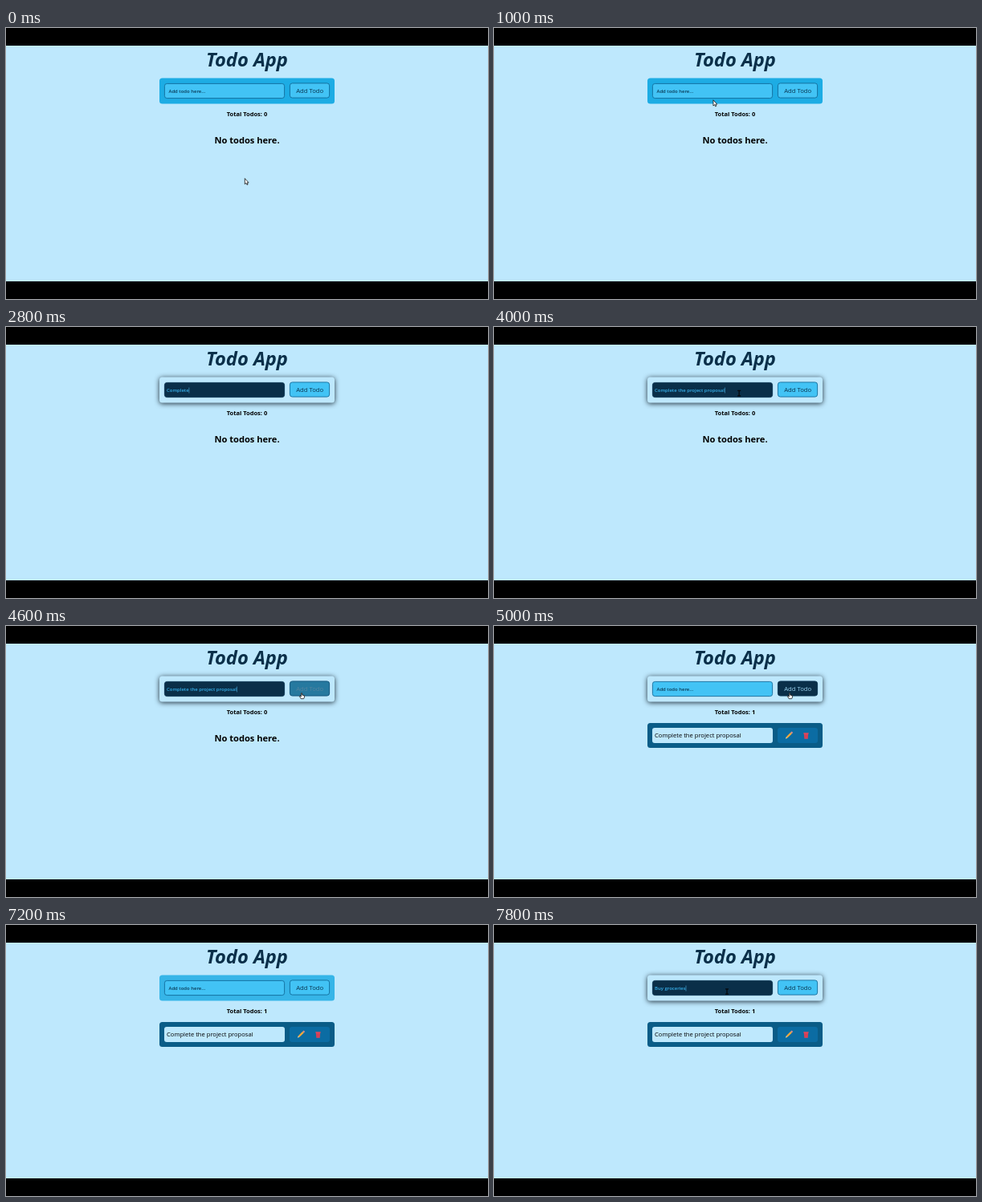
An HTML page for the animation above (8 s loop, 600 by 338 pixels).

```html
<!DOCTYPE html>
<html lang="en">
<head>
<meta charset="utf-8">
<title>Todo App</title>
<style>
  html, body { margin: 0; width: 100%; height: 100%; overflow: hidden; background: #000; }
  svg { display: block; width: 100%; height: 100%; font-family: "Open Sans", "Noto Sans", sans-serif; }
  .mid { text-anchor: middle; }
  .bold { font-weight: 700; }
  .small { font-size: 5.95px; font-weight: 600; }
</style>
</head>
<body>
<svg viewBox="0 0 600 338">
  <rect y="22" width="600" height="294" fill="#bee8fd"/>
  <text class="mid bold" x="300" y="48" font-size="23.7" font-style="italic" fill="#0a2f49">Todo App</text>

  <rect id="form" x="191" y="62.5" width="218" height="32" rx="3.5"/>
  <rect id="field" x="197.4" y="69.4" width="149.2" height="18.2" rx="3" stroke-width="0.9"/>
  <text id="hint" class="small" x="202.5" y="81.2" fill="#0b3d5a">Add todo here...</text>
  <text id="typed" class="small" x="200" y="81.2" fill="#36aee8"></text>
  <rect id="caret" y="75.5" width="0.6" height="7" fill="#4fb0de"/>
  <rect id="add" x="353.4" y="68.9" width="49.2" height="18.2" rx="3" stroke-width="0.9"/>
  <text id="addText" class="mid" x="378.2" y="81.2" font-size="7.7" font-weight="500">Add Todo</text>

  <text id="total" class="mid bold" x="300" y="110.3" font-size="7.5"></text>
  <text id="none" class="mid bold" x="300" y="143.5" font-size="11.1">No todos here.</text>

  <g id="card">
    <rect x="191" y="121" width="218" height="31" rx="3.5" fill="#0a5c87"/>
    <rect x="197" y="127" width="150" height="19" rx="3" fill="#bee8fd"/>
    <text x="200" y="138.9" font-size="7.6" font-weight="500">Complete the project proposal</text>
    <rect x="353" y="127" width="50" height="19" rx="3" fill="#0b6ca3"/>
    <path d="M364.6 139 L370 133.6" stroke="#f5a93a" stroke-width="2.2"/>
    <path d="M370 133.6 L371.4 132.2" stroke="#d98a8f" stroke-width="2.2"/>
    <path d="M362.8 140.8 L363.8 138.2 L365.4 139.8Z" fill="#e9d3a4"/>
    <path d="M385.3 133.2H391.7V134.5H391.2L390.7 140.8H386.3L385.8 134.5H385.3Z" fill="#e0465c"/>
    <path d="M387.3 135.5V139.8M389.7 135.5V139.8" stroke="#b3324b" stroke-width="0.6"/>
  </g>

  <g id="pointer">
    <path id="arrow" d="M0 0V7.2L1.6 5.8L2.7 8L3.8 7.5L2.8 5.3H4.8Z" fill="#fff" stroke="#111" stroke-width="0.8"/>
    <path id="beam" d="M-2 -3.2H2M0 -3.2V3.2M-2 3.2H2" fill="none" stroke="#05090d" stroke-width="1.3"/>
    <path id="hand" d="M-0.7 0.4Q0 -0.5 0.7 0.4V2.6L3.4 3.3V5.6L2.6 7.2H-0.8L-2.7 4.2L-2 3.6L-0.7 4.6Z" fill="#fff" stroke="#111" stroke-width="0.8"/>
  </g>
</svg>
<script>
const LOOP = 8000, STEP = 200;
const el = {};
document.querySelectorAll("[id]").forEach(n => el[n.id] = n);

// Pointer moves: start, end, target x and y
const moves = [
  [0, 1200, 271, 82],
  [3600, 4600, 368, 83.5],
  [6200, 6400, 487.2, 130.4],
  [6400, 7400, 290, 83]
];

// Eased rise from 0 to 1
function ramp(t, from, to) {
  const p = Math.min(1, Math.max(0, (t - from) / (to - from)));
  return p * p * (3 - 2 * p);
}

const within = (t, from, to) => t >= from && t < to;
const mix = (a, b, p) => `color-mix(in srgb, ${b} ${p * 100}%, ${a})`;
const show = (node, on) => node.style.display = on ? "" : "none";

function paint(node, fill, stroke) {
  node.style.fill = fill;
  if (stroke) node.style.stroke = stroke;
}

function pointerAt(t) {
  let x = 297.3, y = 187.6;
  for (const [from, to, tx, ty] of moves) {
    const p = ramp(t, from, to);
    x += (tx - x) * p;
    y += (ty - y) * p;
  }
  return [x, y];
}

function pointerKind(x, y) {
  if (y < 69 || y > 88) return "arrow";
  if (x > 197 && x < 347) return "beam";
  return x > 353 && x < 403 ? "hand" : "arrow";
}

// Text appears a word per step
function typedText(t) {
  if (t >= 7800) return "Buy groceries";
  if (!within(t, 2800, 5000)) return "";
  return "Complete the project proposal".split(" ").slice(0, (t - 2600) / STEP).join(" ");
}

function draw(t) {
  const hover = ramp(t, 1000, 1400) - ramp(t, 6400, 6800) + ramp(t, 7100, 7500);
  const focus = ramp(t, 1400, 1800) - ramp(t, 4800, 5000) + ramp(t, 7400, 7600);
  const press = ramp(t, 4400, 4800) - ramp(t, 6400, 6800);
  const text = typedText(t), added = t >= 5000;
  const [x, y] = pointerAt(t);
  const hidden = within(t, 2800, 3800) || within(t, 7200, 7400);
  const kind = hidden ? "" : pointerKind(x, y);

  paint(el.form, mix("#1dace4", "#bee8fd", hover));
  el.form.style.filter = hover > .2 ? `drop-shadow(0 1px 3.2px rgba(0, 10, 20, ${.85 * hover}))` : "none";
  paint(el.field, mix("#42c3f5", "#0a2f49", focus), mix("#126c9b", "#0b3451", focus));
  paint(el.add, mix("#42c3f5", "#0a2f49", press), mix("#126c9b", "#0a3350", press));
  paint(el.addText, mix("#0a3450", "#9bd3ef", press));

  show(el.hint, !text);
  el.typed.textContent = text;
  show(el.caret, focus > .9 && !within(t, 2200, 2800));
  el.caret.setAttribute("x", 200 + (text ? el.typed.getComputedTextLength() : 0));

  el.total.textContent = "Total Todos: " + (added ? 1 : 0);
  show(el.none, !added);
  show(el.card, added);

  for (const k of ["arrow", "beam", "hand"]) show(el[k], k === kind);
  el.pointer.setAttribute("transform", `translate(${x} ${y})`);
}

const start = performance.now();
function tick() {
  const t = (performance.now() - start) % LOOP;
  draw(Math.floor(t / STEP) * STEP);
  requestAnimationFrame(tick);
}
tick();
</script>
</body>
</html>
```
